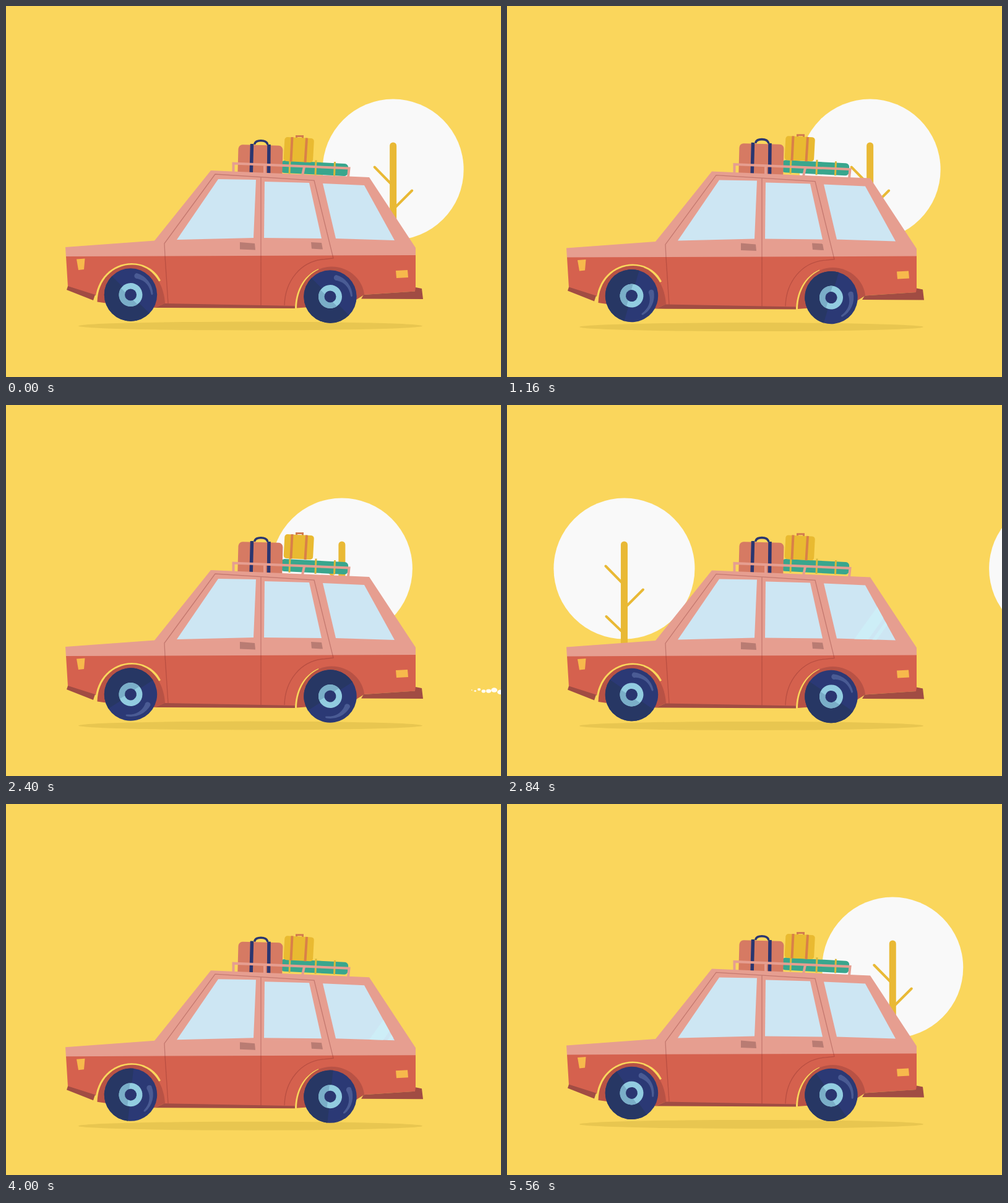
An HTML page for the animation above (5.6 s loop, 800x600 px).

```html
<!DOCTYPE html>
<html lang="en">
<head>
<meta charset="utf-8">
<title>Road trip</title>
<style>
  html, body { margin: 0; width: 100%; height: 100%; overflow: hidden; background: #fad65c; }
  svg { display: block; width: 100vw; height: 100vh; }
  .pink { fill: #e69e90; }
  .red { fill: #d5614e; }
  .arch { fill: #b85245; }
  .trim { fill: #a14c43; }
  .glass { fill: #cde6f3; }
  .grip { fill: #b97c73; }
  .lamp { fill: #f7b94c; }
  .gap { fill: #fad65c; }
  .seam { fill: none; stroke: #7d2b2b; stroke-opacity: .32; stroke-width: 1.3; }
  .rack { fill: none; stroke: #e69e90; stroke-width: 4; }
</style>
</head>
<body>
<svg viewBox="0 0 800 600" preserveAspectRatio="none">
  <defs>
    <clipPath id="rearWindow"><path d="M512 287L579 290L628 379L533 376Z"/></clipPath>
    <clipPath id="behindCar"><rect x="674" y="400" width="126" height="120"/></clipPath>
    <g id="tree" stroke="#e9b935" stroke-linecap="round" fill="none">
      <circle cy="264.5" r="114" fill="#f9f9f9" stroke="none"/>
      <path d="M0 226V444" stroke-width="11"/>
      <path d="M-30 260.500L-4 287M30.500 298.500L3 326M-29 342L-3 367" stroke-width="4"/>
    </g>
    <g id="wheel">
      <circle r="42.700" fill="#2b3975"/>
      <path d="M30.200 30.200A42.700 42.700 0 0 1 -30.200 -30.200Z" fill="#273764"/>
      <path d="M10 -35A36.500 36.500 0 0 1 36 -1Q34 2 33 -1C31 -14 24 -23 11 -26A4.500 4.500 0 0 1 10 -35Z" fill="#4a5b94"/>
      <circle r="19" fill="#92cce0"/>
      <path d="M10.900 15.560A19 19 0 0 1 -15.560 -10.900Z" fill="#7aaec8"/>
      <circle r="9.500" fill="#2a3670"/>
    </g>
  </defs>

  <rect width="800" height="600" fill="#fad65c"/>
  <g id="trees"></g>

  <g id="car">
    <ellipse cx="395" cy="517.500" rx="278" ry="7" fill="#e8c650"/>

    <g id="green">
      <g transform="rotate(3 499 262)">
        <rect x="444" y="252.500" width="109" height="20" rx="6" fill="#39a68d"/>
      </g>
      <path d="M459 247.500L458 272M501 249.500L500 274M531.500 252L530.500 275" stroke="#d9b83c" stroke-width="3"/>
    </g>
    <g id="yellow">
      <path d="M469.500 213.500V210.500H479.500V214" fill="none" stroke="#d17b50" stroke-width="3"/>
      <g transform="rotate(3 473 232)">
        <rect x="449.500" y="213" width="47.500" height="39" rx="4.500" fill="#e9ba31"/>
      </g>
      <path d="M462.500 212L460.500 251.500M486 213.500L483.500 253" stroke="#d98048" stroke-width="4"/>
    </g>
    <g id="redCase">
      <path d="M402 222.500C404 216 420 216 422.500 223" fill="none" stroke="#2a3670" stroke-width="3.600" stroke-linecap="round"/>
      <g transform="rotate(1.500 411 249)">
        <rect x="375" y="225" width="72" height="56" rx="7" fill="#d67a63"/>
      </g>
      <path d="M397.500 223L396 280M425 224L424.500 280" stroke="#2a3670" stroke-width="5.500"/>
    </g>

    <path class="rack" d="M367.500 269V254.500L554.500 262.500L553 277M418 257V271M482 260L479 274"/>
    <path class="pink" d="M96 390L240 379.500L331 266L587 277L662 391V404L97 406Z"/>
    <path class="red" d="M97 405L662 403V461.500L578 467L490 475L467 486L257 482L160 470L144 468L100 454Z"/>
    <path class="trim" d="M100 453L98 459L141 476L144 467Z"/>
    <path class="trim" d="M578 467L661 461.500L662 455L672 457L674 474L574 473.500Z"/>
    <path class="trim" d="M240 488L256 481L467 485V489Z"/>

    <path class="gap" d="M144 479C145 441 172 416 203 416C224 416 242 427 250 444L200 470L150 479Z"/>
    <path class="arch" d="M147.500 478.500C148 443 173 418.500 204 418.500C235 418.500 255 447 257 481L240 488L165 481Z"/>
    <path class="gap" d="M467 491C467 462 480 436 505 425L510 440L480 488Z"/>
    <path class="arch" d="M470 488.500C470 452 494 421.500 526 421.500C556 421.500 577 444 579 467L566 475L490 487Z"/>

    <path class="seam" d="M262 481L257 405L256 384L338 272L498 282L529 408L515 409.500C476 412 451 445 450 484M412 277V484"/>

    <path class="glass" d="M343 280L404 281L400 375L276 378Z"/>
    <path class="glass" d="M418 284L490 286L510 376L417 375Z"/>
    <path class="glass" d="M512 287L579 290L628 379L533 376Z"/>
    <g clip-path="url(#rearWindow)">
      <path id="shine" d="M533 379L599 287H622L556 379ZM563 379L629 287H636L570 379Z" fill="#cdeef7"/>
    </g>

    <path class="grip" d="M378 382L402 384L403 394.500L378 393.500Z"/>
    <path class="grip" d="M493 382L510 383L512 393.500L494 392.500Z"/>
    <path class="lamp" d="M114 409.500L127.500 408.500L126 426L117 427Z"/>
    <path class="lamp" d="M630 428L649 427L650 439L631 440Z"/>

    <use class="wheel" href="#wheel" data-x="201.500" data-y="467"/>
    <use class="wheel" href="#wheel" data-x="524" data-y="470"/>

    <g clip-path="url(#behindCar)"><g id="smoke" fill="#fffdf6"></g></g>
  </g>
</svg>

<script>
  const LOOP = 5600;
  const TREE_SPEED = 0.796;
  const SPIN = 360 / 1400;
  const SMOKE_ENDS = [2400, 4600];

  // Times at which each tree's trunk crosses the left edge
  const TREE_STARTS = [-785, 424, 1719, 2603, 4778];

  // [time, offset] pairs for the bumpy ride
  const BUMPS = {
    car: [[0, 0], [640, 1], [1200, 1.6], [1680, 0.6], [2400, 1], [3320, 1.9], [3850, 3.4], [4800, -0.4], [5150, 1], [5560, 0.4]],
    redCase: [[0, 0], [640, -4], [1680, -3.4], [2400, -4], [3320, -5], [4800, -4], [5560, -4.4]],
    yellow: [[0, 0], [640, -2], [1680, -4.6], [2400, -4], [3320, -2], [4800, -1.6], [5560, -2.4]],
    green: [[0, 0], [640, -3], [1680, -1.6], [2400, -2], [3320, -3], [4800, -1.6], [5560, -1.8]]
  };

  const byId = id => document.getElementById(id);
  const move = (el, x, y) => el.setAttribute("transform", `translate(${x} ${y})`);

  function add(parent, tag, attrs) {
    const el = document.createElementNS("http://www.w3.org/2000/svg", tag);
    for (const key in attrs) el.setAttribute(key, attrs[key]);
    parent.append(el);
    return el;
  }

  function sample(keys, t) {
    const i = keys.findIndex(key => key[0] > t);
    if (i < 0) return keys[keys.length - 1][1];
    const [t0, a] = keys[i - 1];
    const [t1, b] = keys[i];
    const ease = (1 - Math.cos(Math.PI * (t - t0) / (t1 - t0))) / 2;
    return a + (b - a) * ease;
  }

  const trees = TREE_STARTS.map(() => add(byId("trees"), "use", { href: "#tree" }));
  const wheels = [...document.querySelectorAll(".wheel")];
  const smoke = byId("smoke");
  const shine = byId("shine");

  // A trail of specks, small at the tail and larger toward the front
  for (let i = 0; i < 12; i++) {
    const size = Math.min(1 + i * 0.8, 5);
    add(smoke, "ellipse", {
      cx: i * 5 + i * i * 0.45,
      cy: Math.sin(i * 2.3) * 1.6 + i * 0.3,
      rx: size,
      ry: size * 0.75
    });
  }

  function draw(t) {
    trees.forEach((tree, i) => move(tree, (t - TREE_STARTS[i]) * TREE_SPEED, 0));
    for (const id in BUMPS) move(byId(id), 0, sample(BUMPS[id], t));
    for (const wheel of wheels) {
      const { x, y } = wheel.dataset;
      wheel.setAttribute("transform", `translate(${x} ${y}) rotate(${-t * SPIN})`);
    }
    const sweep = (t - 1680 + 2750) % 1100 - 550;
    move(shine, sweep * 0.44, 0);
    const end = t < 3400 ? SMOKE_ENDS[0] : SMOKE_ENDS[1];
    move(smoke, 752 + (t - end) * 0.8, 460);
  }

  const start = performance.now();
  function tick() {
    draw((performance.now() - start) % LOOP);
    requestAnimationFrame(tick);
  }
  draw(0);
  requestAnimationFrame(tick);
</script>
</body>
</html>
```
